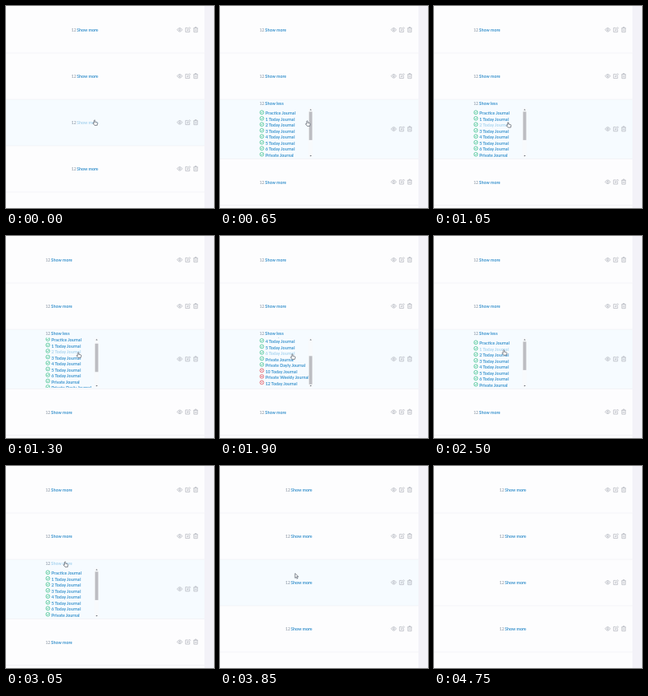
Animation of 261x253 px, one loop 4800 ms. Source, as an HTML page:

```html
<!DOCTYPE html>
<html lang="en">
<head>
<meta charset="utf-8">
<title>Journal list</title>
<style>
html, body { margin: 0; height: 100%; overflow: hidden; background: #fdfdfe; }
svg { display: block; width: 261px; height: 253px; }
text { font: 5.35px Lato, "Open Sans", sans-serif; fill: #8793a2; }
.link { font-weight: 700; fill: #3a93cd; }
.link.hover { fill: #a9d4ef; }
.icon { fill: none; stroke: #a9acb5; stroke-width: .65; }
.mark { fill: none; stroke-width: .75; }
.cursor { fill: #fff; stroke: #59616c; stroke-width: .75; stroke-linejoin: round; }
</style>
</head>
<body>
<svg viewBox="0 0 261 253">
  <defs>
    <clipPath id="view"><rect x="48" y="127.5" width="69" height="62.5"/></clipPath>
    <g id="tools" class="icon">
      <path d="M214.7 0q3.3-4.8 6.6 0q-3.3 4.8-6.6 0z"/>
      <circle cx="218" r="1.1"/>
      <path d="M228.3-2.4h-3v5.2h5v-2.8M227.3 1l.3-1.5 2.7-2.7 1.1 1.1-2.7 2.7z"/>
      <path d="M235.2-2h5.6M237-2v-1.2h2v1.2M235.8-2v4.9h4.4v-4.9M237.2-.4v1.9M238.8-.4v1.9"/>
    </g>
  </defs>
  <rect id="glow" width="249" fill="#f6fbff"/>
  <g id="rows"></g>
  <g id="panel">
    <g clip-path="url(#view)"><g id="list"></g></g>
    <rect x="111" y="127.5" width="5.4" height="62.5" fill="#f8fafc"/>
    <path d="M112.6 130.6l1.2-1.5 1.2 1.5zM112.6 187l1.2 1.5 1.2-1.5z" fill="#666c75"/>
    <rect id="thumb" x="111.7" width="4" height="35.5" fill="#bcbdc2"/>
  </g>
  <rect x="249" width="12" height="253" fill="#f3f2f8"/>
  <g id="cursor" class="cursor">
    <path id="hand" d="M-1.5 .7v-3.4q.7-1 1.4 0v2l2.3.5q.8.2.7 1l-.5 2.6h-3.3l-2.1-2.6q.4-1 1.5-.1z"/>
    <path id="arrow" d="M-1.5-3.2v5.8l1.4-1.3 1 2.1 1-.5-1-2h1.9z"/>
  </g>
</svg>
<script>
const LOOP = 4800, PITCH = 7.5, TOP = 134.5;
const OPEN = 300, RELABEL = 3000, CLOSE = 3150;
const $ = id => document.getElementById(id);
const names = ['Practice Journal', ...[1, 2, 3, 4, 5, 6].map(n => n + ' Today Journal'),
  'Private Journal', 'Private Dayly Journal', '10 Today Journal',
  'Private Weekly Journal', '12 Today Journal'];

// [time, x, y] and [time, offset]
const path = [[0, 112, 146], [200, 112, 146], [600, 110.3, 147], [700, 110.3, 147],
  [1150, 91.5, 149], [1300, 91.5, 149], [1900, 91.5, 151], [2350, 91.5, 151],
  [2900, 75, 123], [3300, 75, 123], [3900, 96, 138], [4400, 140, 262], [LOOP, 140, 262]];
const scrolls = [[0, 0], [1220, 0], [1300, 4.2], [1750, 32.5], [1900, 32.5], [2130, 0], [LOOP, 0]];

function at(keys, t, ease = k => k) {
  const i = keys.findIndex(k => k[0] > t), a = keys[i - 1], b = keys[i];
  const k = ease((t - a[0]) / (b[0] - a[0]));
  return a.slice(1).map((v, j) => v + (b[j + 1] - v) * k);
}
const smooth = k => k * k * (3 - 2 * k);
const move = (el, x, y) => el.setAttribute('transform', `translate(${x} ${y})`);
const show = (el, on) => el.setAttribute('display', on ? 'inline' : 'none');

$('rows').innerHTML = [0, 1, 2, 3].map(() => `<g>
  <g><text y="2">12</text><text class="link" x="7" y="2">Show more</text></g>
  <use href="#tools"/><path d="M0 0H249" stroke="#f0eff4" stroke-width=".7"/></g>`).join('');
$('list').innerHTML = names.map((name, i) => {
  const ok = i < 9, y = TOP + i * PITCH;
  return `<g class="mark" stroke="${ok ? '#3fc08c' : '#e0565f'}" transform="translate(52.5 ${y - 1.2})">
    <circle r="2.4"/><path d="${ok ? 'M-1.1 0l.8.9 1.5-1.7' : 'M-.9-.9l1.8 1.8M.9-.9l-1.8 1.8'}"/></g>
    <text class="link" x="57" y="${y + 1.9}">${name}</text>`;
}).join('');
const rows = [...$('rows').children];
const items = [...$('list').querySelectorAll('.link')];
const label = rows[2].querySelector('.link');

function draw(t) {
  const open = t >= OPEN && t < CLOSE, grow = open ? 16.5 : 0;
  const [x, y] = at(path, t, smooth), [scroll] = at(scrolls, t);
  const left = open ? 49.5 : 82, tip = y - 2.5;

  rows.forEach((row, i) => {
    const mid = 30 + 58 * i + (i > 2 ? grow : 0), big = i === 2 ? grow : 0;
    const [text, tools, line] = row.children;
    move(text, left, open && i === 2 ? 122 : mid);
    move(tools, 0, mid + big / 2 - .2);
    move(line, 0, mid + 29 + big);
  });

  const lower = tip > 175 + grow;
  $('glow').setAttribute('y', lower ? 175 + grow : 117);
  $('glow').setAttribute('height', lower ? 58 : 58 + grow);
  show($('glow'), tip < 233 + grow);

  const labelY = open ? 122 : 146;
  const onLabel = Math.abs(tip - labelY) < 4 && x > left + 6 && x < left + 35;
  label.textContent = open && t < RELABEL ? 'Show less' : 'Show more';
  label.classList.toggle('hover', onLabel);

  // Hover stays on the last item while the list scrolls back
  let over = open && x < 96 && tip > 128 ? Math.round((tip + scroll - TOP) / PITCH) : -1;
  if (t >= 1900 && t < 2250) over = 6;
  items.forEach((el, i) => el.classList.toggle('hover', i === over));

  show($('panel'), open);
  move($('list'), 0, -scroll);
  $('thumb').setAttribute('y', 132.4 + scroll * 18 / 32.5);

  const link = onLabel || over >= 0 || t < 750;
  show($('hand'), link);
  show($('arrow'), !link);
  move($('cursor'), x, y);
}

function tick() {
  draw(performance.now() % LOOP);
  requestAnimationFrame(tick);
}
tick();
</script>
</body>
</html>
```
